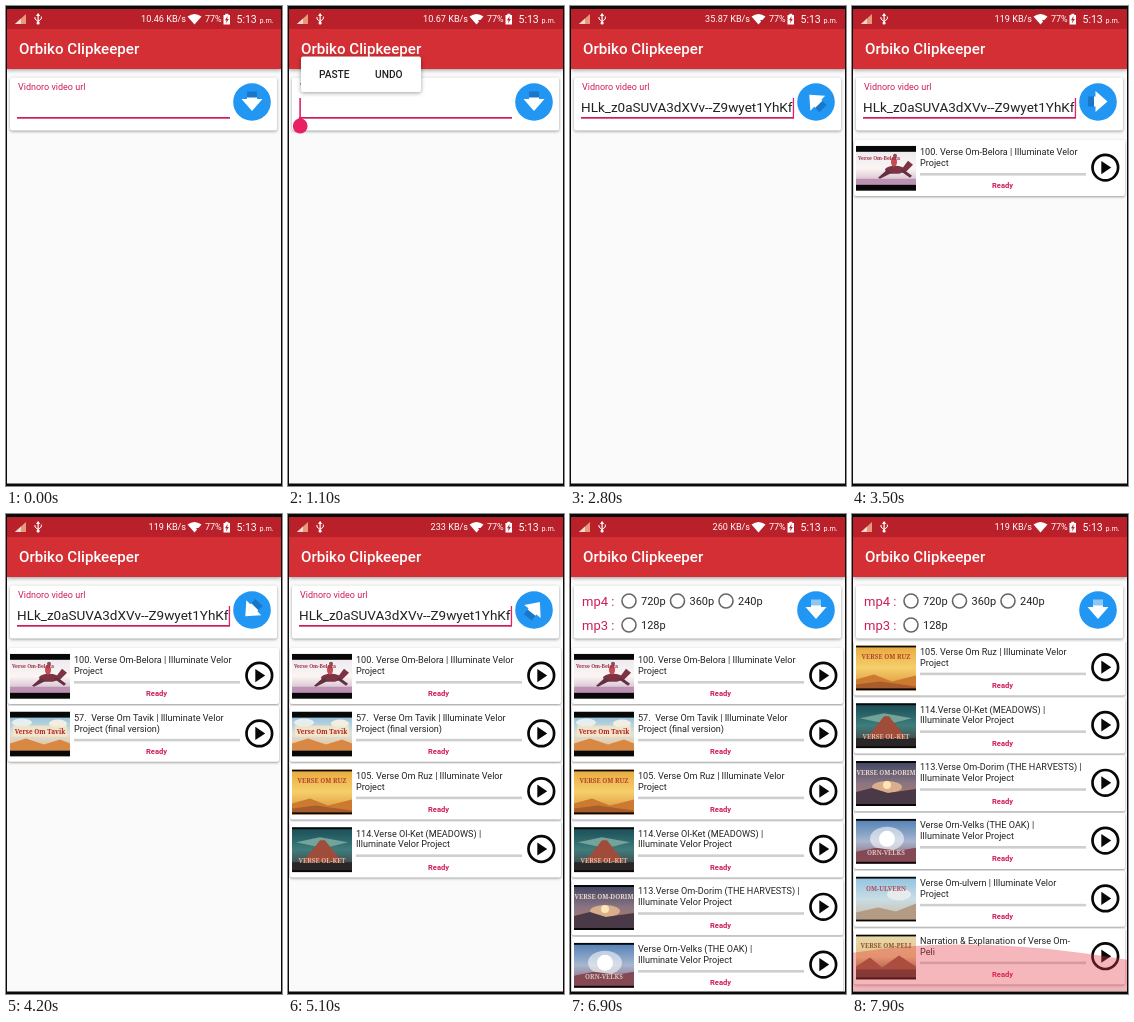
Recreate the animation shown at these times as an HTML page with a canvas. Size 276 by 480 pixels, loop 8 s.

```html
<!DOCTYPE html>
<html lang="en">
<head>
<meta charset="utf-8">
<title>Clip list</title>
<style>
html, body { margin: 0; width: 276px; height: 480px; overflow: hidden; background: #000; }
canvas { display: block; }
</style>
</head>
<body>
<canvas id="stage" width="276" height="480"></canvas>
<script>
const ctx = document.getElementById('stage').getContext('2d');
const LOOP = 8000, TICK = 100;
const PINK = '#cf1d5b', ACCENT = '#e91e63', BLUE = '#2196f3';
const LIST_TOP = 134, PITCH = 57.8;
const PROJECT = 'Illuminate Velor Project';

const speeds = [[0, '10.46'], [100, '10.67'], [1600, '35.87'], [3000, '119'],
  [4800, '233'], [5700, '260'], [7600, '119']];
const scrolls = [[0, 0], [7600, 30], [7700, 78], [7800, 116], [7900, 124]];

// lines, caption, caption colour, sky colours, scene
const items = [
  { at: 3400, lines: ['100. Verse Om-Belora | Illuminate Velor', 'Project'], cap: 'Verse Om-Belora', ink: '#9c3040', sky: ['#e9e6ee', '#fbf5f3', '#b995b4'], scene: rider, bars: 1 },
  { at: 4000, lines: ['57.  Verse Om Tavik | Illuminate Velor', 'Project (final version)'], cap: 'Verse Om Tavik', ink: '#b3202c', sky: ['#7db9dc', '#dfe3dc', '#e8a45e'], scene: clouds, bars: 1 },
  { at: 4600, lines: ['105. Verse Om Ruz | Illuminate Velor', 'Project'], cap: 'VERSE OM RUZ', ink: '#b4442c', sky: ['#e8a83c', '#f5cf6c', '#d98a35'], scene: dunes },
  { at: 5000, lines: ['114.Verse Ol-Ket (MEADOWS) |', PROJECT], cap: 'VERSE OL-KET', ink: '#d9b9a2', sky: ['#174b55', '#3f7d7c', '#472e30'], scene: peak, low: 1 },
  { at: 5500, lines: ['113.Verse Om-Dorim (THE HARVESTS) |', PROJECT], cap: 'VERSE OM-DORIM', ink: '#e9d4cc', sky: ['#3d4560', '#8b7583', '#c07a55'], scene: dusk },
  { at: 6000, lines: ['Verse Orn-Velks (THE OAK) |', PROJECT], cap: 'ORN-VELKS', ink: '#d9c4c4', sky: ['#4f7fb5', '#a7b6cf', '#8a4f5d'], scene: sun, low: 1 },
  { at: 6000, lines: ['Verse Om-ulvern | Illuminate Velor', 'Project'], cap: 'OM-ULVERN', ink: '#b0515c', sky: ['#8fc2e0', '#c9dde5', '#cdb79d'], scene: hills },
  { at: 6000, lines: ['Narration & Explanation of Verse Om-', 'Peli'], cap: 'VERSE OM-PELI', ink: '#8a5436', sky: ['#ead9ab', '#e2c487', '#6b4a33'], scene: ridge }
];

const valueAt = (steps, t) => steps.filter(s => s[0] <= t).pop()[1];

function rect(x, y, w, h, color) {
  ctx.fillStyle = color;
  ctx.fillRect(x, y, w, h);
}

function disc(x, y, r, color) {
  ctx.fillStyle = color;
  ctx.beginPath();
  ctx.arc(x, y, r, 0, Math.PI * 2);
  ctx.fill();
}

function ring(x, y, r, width, color) {
  ctx.strokeStyle = color;
  ctx.lineWidth = width;
  ctx.beginPath();
  ctx.arc(x, y, r, 0, Math.PI * 2);
  ctx.stroke();
}

function poly(color, ...pts) {
  ctx.fillStyle = color;
  ctx.beginPath();
  for (let i = 0; i < pts.length; i += 2) ctx.lineTo(pts[i], pts[i + 1]);
  ctx.fill();
}

function blob(x, y, rx, ry, color) {
  ctx.fillStyle = color;
  ctx.beginPath();
  ctx.ellipse(x, y, rx, ry, 0, 0, Math.PI * 2);
  ctx.fill();
}

function text(str, x, y, size, color, weight = 400, align = 'left', family = 'Roboto, sans-serif') {
  ctx.font = `${weight} ${size}px ${family}`;
  ctx.fillStyle = color;
  ctx.textAlign = align;
  ctx.fillText(str, x, y);
}

function card(x, y, w, h, blur = 3) {
  ctx.save();
  ctx.shadowColor = 'rgba(0,0,0,.38)';
  ctx.shadowBlur = blur;
  ctx.shadowOffsetY = 1;
  ctx.fillStyle = '#fff';
  ctx.beginPath();
  ctx.roundRect(x, y, w, h, 2);
  ctx.fill();
  ctx.restore();
}

// Thumbnail scenes, drawn in a 60 x 45 box
function rider() {
  rect(0, 33, 60, 6, '#bd91b4');
  blob(39, 24, 10, 4, '#7b3345');
  poly('#7b3345', 46, 23, 52, 15, 57, 19, 50, 26);
  poly('#63303f', 31, 24, 22, 32, 24, 33, 36, 27);
  poly('#63303f', 44, 25, 54, 32, 56, 30, 48, 24);
  blob(38, 16, 3, 5, '#c64b52');
  disc(39, 10, 2, '#80515a');
}
function clouds() {
  blob(12, 11, 10, 4, '#e6eef0');
  blob(48, 12, 9, 4, '#f0eee6');
  rect(3, 14, 54, 11, 'rgba(250,232,195,.75)');
  poly('#d98843', 0, 32, 16, 27, 34, 33, 50, 28, 60, 32, 60, 39, 0, 39);
}
function dunes() {
  poly('#cc7a30', 0, 34, 18, 29, 36, 36, 60, 30, 60, 45, 0, 45);
  poly('#a85c2b', 0, 39, 24, 36, 60, 41, 60, 45, 0, 45);
}
function peak() {
  poly('#73a39a', 4, 15, 28, 10, 56, 15, 32, 21);
  poly('#a04c3a', 10, 36, 28, 13, 33, 13, 51, 36);
  rect(0, 35, 60, 10, '#2c2528');
}
function dusk() {
  blob(31, 26, 15, 6, 'rgba(255,205,150,.65)');
  disc(31, 24, 4, '#ffe4b5');
  poly('#4a3a48', 0, 31, 16, 27, 32, 32, 60, 28, 60, 45, 0, 45);
}
function sun() {
  blob(31, 20, 17, 12, 'rgba(255,255,255,.55)');
  disc(31, 20, 8, '#fff');
  poly('#844955', 0, 33, 20, 29, 42, 32, 60, 29, 60, 45, 0, 45);
}
function hills() {
  blob(43, 18, 12, 6, '#e5eceb');
  poly('#b39b85', 0, 36, 22, 31, 40, 35, 60, 27, 60, 45, 0, 45);
}
function ridge() {
  poly('#8b5b3b', 0, 32, 14, 23, 26, 33, 43, 21, 60, 32, 60, 45, 0, 45);
  rect(0, 35, 60, 10, '#4e3c30');
}

function thumb(item, x, y) {
  ctx.save();
  ctx.translate(x, y);
  ctx.beginPath();
  ctx.rect(0, 0, 60, 45);
  ctx.clip();
  const sky = ctx.createLinearGradient(0, 0, 0, 45);
  item.sky.forEach((c, i) => sky.addColorStop(i / 2, c));
  rect(0, 0, 60, 45, sky);
  item.scene();
  const capX = item.bars && item.scene === rider ? 23 : 30;
  const capY = item.low ? 36 : item.bars ? (item.scene === rider ? 14 : 22) : 14;
  const size = item.scene === rider ? 5 : 6.4;
  text(item.cap, capX, capY, size, item.ink, 700, 'center', '"Noto Serif", serif');
  const bar = item.bars ? 6 : 2;
  rect(0, 0, 60, bar, '#080808');
  rect(0, 45 - bar, 60, bar, '#080808');
  ctx.restore();
}

function row(item, y) {
  card(2, y, 271, 56, 2.5);
  thumb(item, 4, y + 5.8);
  item.lines.forEach((line, i) => text(line, 68, y + 15.2 + i * 10.7, 9.1, '#222'));
  rect(68, y + 33, 166, 2.6, '#cfcfcf');
  text('Ready', 150.5, y + 48.4, 7.6, PINK, 700, 'center');
  ring(253.3, y + 27.6, 12.8, 2.7, '#080808');
  poly('#080808', 249.3, y + 21, 249.3, y + 34.2, 259.2, y + 27.6);
}

function list(t) {
  const offset = valueAt(scrolls, t);
  ctx.save();
  ctx.beginPath();
  ctx.rect(1, 128, 274, 349);
  ctx.clip();
  items.forEach((item, i) => {
    if (t >= item.at) row(item, LIST_TOP + i * PITCH - offset);
  });
  if (t >= 7900) {
    ctx.fillStyle = 'rgba(229,57,70,.36)';
    ctx.beginPath();
    ctx.moveTo(0, 439);
    ctx.quadraticCurveTo(120, 419, 276, 446);
    ctx.lineTo(276, 478);
    ctx.lineTo(0, 478);
    ctx.fill();
  }
  ctx.restore();
}

function statusBar(t) {
  rect(1, 3, 274, 20, '#b9202a');
  poly('#e59a7c', 9, 18, 20, 18, 20, 8);
  poly('#f5d9d0', 9, 18, 15, 18, 15, 12.5);
  rect(31.5, 8, 1.2, 10, '#fff');
  poly('#fff', 30, 10, 32.1, 7, 34.2, 10);
  disc(32.1, 17, 1.6, '#fff');
  ctx.strokeStyle = '#fff';
  ctx.lineWidth = 1;
  ctx.beginPath();
  ctx.moveTo(29, 11);
  ctx.lineTo(29, 13);
  ctx.lineTo(32, 15.5);
  ctx.lineTo(35.3, 13);
  ctx.lineTo(35.3, 10.5);
  ctx.stroke();
  text(valueAt(speeds, t) + ' KB/s', 180, 16.3, 9.1, '#fff', 400, 'right');
  ctx.fillStyle = '#fff';
  ctx.beginPath();
  ctx.moveTo(181.5, 10.5);
  ctx.quadraticCurveTo(188.5, 5.5, 195.5, 10.5);
  ctx.lineTo(188.5, 18.5);
  ctx.fill();
  if (t >= 900 && t < 5700) poly('#b9202a', 190, 14, 196, 14, 193, 18);
  text('77%', 199, 16.3, 9, '#fff');
  rect(217.5, 9, 6.5, 9.5, '#fff');
  rect(219.3, 7.8, 3, 1.5, '#fff');
  poly('#b9202a', 221.6, 10, 219, 14.3, 220.6, 14.3, 220, 17.4, 222.8, 13, 221.2, 13);
  text('5:13', 230.5, 16.6, 10.5, '#fff');
  text('p.m.', 253.5, 16.6, 7.2, '#fff');
}

function header(t) {
  ctx.save();
  ctx.shadowColor = 'rgba(0,0,0,.4)';
  ctx.shadowBlur = 4;
  ctx.shadowOffsetY = 1;
  rect(1, 22, 274, 41, '#d32f34');
  ctx.restore();
  statusBar(t);
  text('Orbiko Clipkeeper', 13, 48, 15.1, '#fff', 500);
}

function downloadButton(t) {
  const spinning = t >= 2100 && t < 6600;
  disc(246, 96, 18.8, BLUE);
  ctx.save();
  ctx.translate(246, 95.5);
  if (spinning) ctx.rotate((t - 2100) / 1867 * Math.PI * 2);
  rect(-5, -10, 10, 8, t < 6600 ? '#1976c8' : '#8cc8f7');
  poly('#fff', -10.5, -2.5, -5, -2.5, -5, -4, 5, -4, 5, -2.5, 10.5, -2.5, 0, 9.5);
  ctx.restore();
}

function option(label, x, y) {
  ring(x, y, 7, 1.6, '#666');
  text(label, x + 12, y + 4, 11, '#222');
}

function options() {
  text('mp4 :', 12, 91.5, 13, PINK);
  ['720p', '360p', '240p'].forEach((label, i) => option(label, 59 + i * 48.5, 87));
  text('mp3 :', 12, 115.5, 13, PINK);
  option('128p', 59, 111);
}

function urlField(t) {
  const pasted = t >= 1700;
  text('Vidnoro video url', 12, 84, 9, PINK);
  rect(11, 111, 213, 1.7, PINK);
  if (pasted) {
    ctx.save();
    ctx.beginPath();
    ctx.rect(10, 88, 214, 24);
    ctx.clip();
    text('HLk_z0aSUVA3dXVv--Z9wyet1YhKf', 222.5, 106, 13.5, '#222', 400, 'right');
    ctx.restore();
    rect(222.8, 92, 1.3, 19, ACCENT);
    return;
  }
  const blinkOn = (t >= 100 && t < 400) || (t >= 600 && t < 1400);
  if (blinkOn) rect(11.3, 92, 1.6, 19, ACCENT);
  if (t >= 900) {
    disc(12.2, 120, 7.4, ACCENT);
    poly(ACCENT, 12.2, 111, 6.5, 116, 18, 116);
  }
}

function pasteMenu(t) {
  if (t < 900 || t >= 1600) return;
  ctx.save();
  ctx.globalAlpha = t < 1000 ? 0.5 : 1;
  card(13, 50.5, 120, 35.5, 4);
  text('PASTE', 31, 72, 10.2, '#222', 500);
  text('UNDO', 87, 72, 10.2, '#222', 500);
  ctx.restore();
}

function draw(t) {
  rect(0, 0, 276, 480, '#0b0b0b');
  rect(1, 3, 274, 474.5, '#fafafa');
  list(t);
  header(t);
  card(4, 71.5, 267, 53);
  if (t < 6600) urlField(t);
  else options();
  downloadButton(t);
  pasteMenu(t);
}

function frame(now) {
  draw(Math.floor(now % LOOP / TICK) * TICK);
  requestAnimationFrame(frame);
}
requestAnimationFrame(frame);
</script>
</body>
</html>
```
